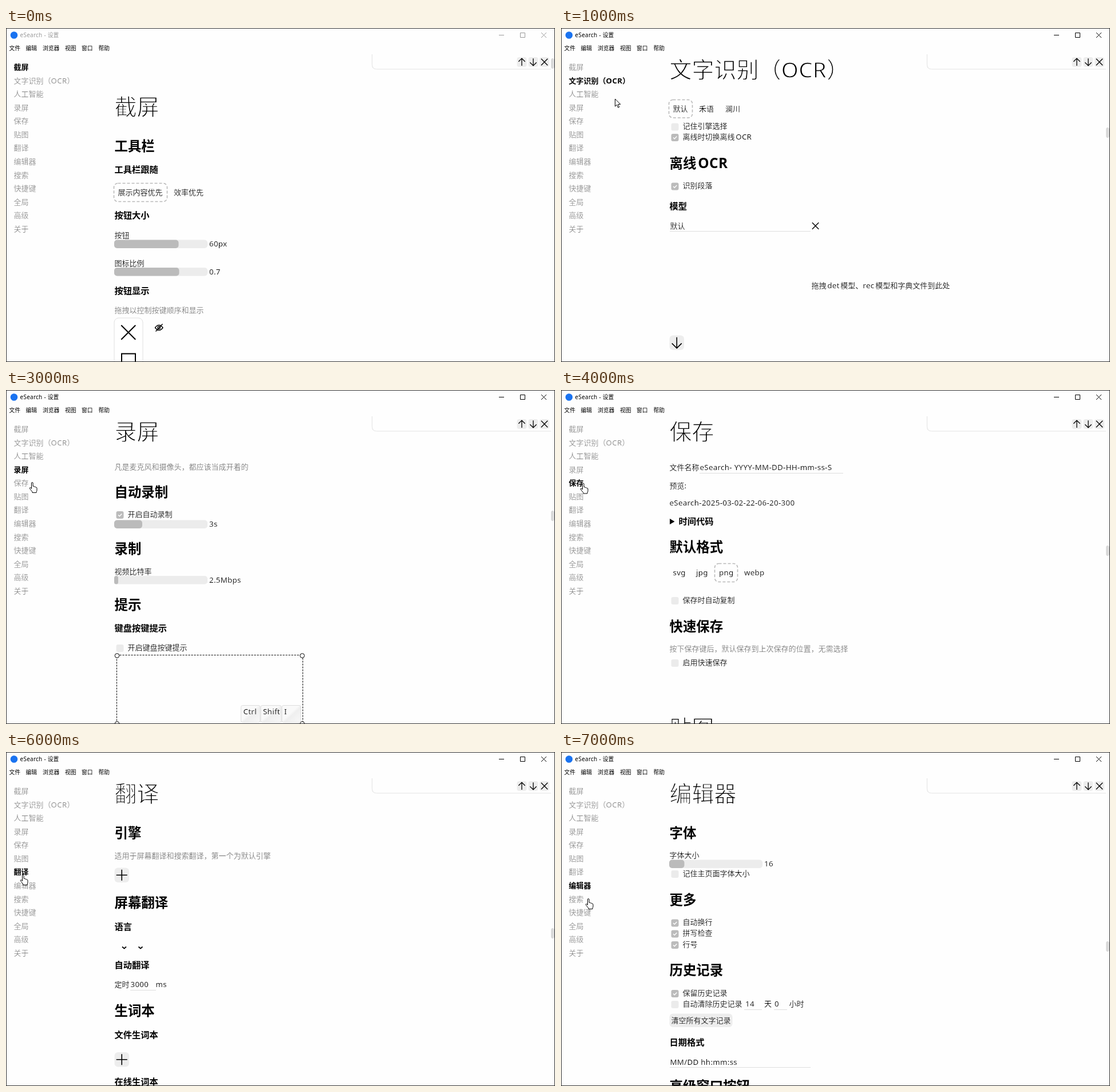
Animation, 959 px wide and 584 px high, one loop 8 s. Source, as an HTML page:

```html
<!DOCTYPE html>
<html lang="zh-CN">
<head>
<meta charset="utf-8">
<title>设置</title>
<style>
html, body { margin: 0; width: 100%; height: 100%; overflow: hidden; background: #fefefe; }
svg { display: block; font-family: "Noto Sans CJK SC", "Noto Sans", sans-serif; }
.latin { font-family: "Noto Sans", sans-serif; font-size: 1.02em; letter-spacing: .026em; }
/* a background-coloured outline thins the strokes to a light weight */
.h1, .p, .note, .nav { stroke: #fefefe; stroke-width: .2; }
.h1 { font-weight: 300; stroke-width: 1.3; }
.h1 .latin { font-size: 1em; letter-spacing: 0; }
.h2, .h3, .on { font-weight: 700; }
.h2 .latin { font-size: 1.04em; letter-spacing: .015em; }
.note { fill: #707070; }
.nav { fill: #858585; }
.line { fill: none; stroke: #000; }
.page { visibility: hidden; animation: show 8s step-end infinite; animation-delay: calc(var(--i) * 1s); }
@keyframes show {
  0% { visibility: visible; }
  12.5%, 100% { visibility: hidden; }
}
</style>
</head>
<body>
<svg id="stage" width="959" height="584" viewBox="0 0 959 584"></svg>
<script>
const SIZE = { h1: 39, h2: 23.4, h3: 15.25, p: 13, note: 13, nav: 13, on: 13, ui: 9.8 };
const ICON = {
  up: 'M12 21V3M4 11l8-8 8 8',
  down: 'M12 3v18M4 13l8 8 8-8',
  cross: 'M4 4l16 16M20 4L4 20',
  plus: 'M12 3v18M3 12h18'
};
const NAV = ['截屏', '文字识别（OCR）', '人工智能', '录屏', '保存', '贴图', '翻译',
  '编辑器', '搜索', '快捷键', '全局', '高级', '关于'];
const WORD = /[\w\u4e00-\u9fff]/;

// y is the optical middle of the line; Latin runs get a small gap beside ideographs
function text(kind, x, y, str, fill = '') {
  const size = SIZE[kind];
  let prev = '';
  const runs = str.match(/[ -~]+|[^ -~]+/g).map(run => {
    const gap = WORD.test(prev) && WORD.test(run[0]) ? size * .13 : 0;
    const cls = /[ -~]/.test(run) ? ' class="latin"' : '';
    prev = run[run.length - 1];
    return `<tspan${cls} dx="${gap}">${run}</tspan>`;
  }).join('');
  return `<text class="${kind}" x="${x}" y="${y + size * .345}" font-size="${size}"${fill && ` fill="${fill}"`}>${runs}</text>`;
}
const h1 = (y, s) => text('h1', 189.5, y, s);
const h2 = (y, s) => text('h2', 189.5, y, s);
const h3 = (y, s, x = 189.5) => text('h3', x, y, s);
const p = (y, s, x = 189.5) => text('p', x, y, s);
const note = (y, s) => text('note', 189.5, y, s);

const box = (x, y, w, h, r, fill, extra = '') =>
  `<rect x="${x}" y="${y}" width="${w}" height="${h}" rx="${r}" fill="${fill}" ${extra}/>`;
const line = (d, width = 1, color = '#000') =>
  `<path class="line" d="${d}" style="stroke:${color};stroke-width:${width}"/>`;
const icon = (name, x, y, size, width) =>
  `<g transform="translate(${x} ${y}) scale(${size / 24})">${line(ICON[name], width * 24 / size)}</g>`;
const button = (name, x, y, size, r, width) =>
  box(x, y, size, size, r, '#ededed') + icon(name, x, y, size, width);
const dashed = (x, y, w, h) =>
  box(x, y, w, h, 7, 'none', 'stroke="#b9b9b9" stroke-width="1.6" stroke-dasharray="5 3"');
const underline = (x1, x2, y) => line(`M${x1} ${y}H${x2}`, 1, '#dedede');

function slider(y, end, label) {
  return box(189, y, 163, 14.5, 5, '#ececec') + box(189, y, end - 189, 14.5, Math.min(5, (end - 189) / 2), '#bbb') +
    p(y + 7.5, label, 355);
}
function check(y, label, on) {
  return box(192.5, y - 5.5, 13, 13, 3, on ? '#bbb' : '#ebebeb') +
    (on ? line(`M196 ${y + 1}l2.3 2.3 4-4.3`, 1.4, '#fff') : '') + p(y, label, 212.5);
}
function keycap(x, w, label) {
  return box(x, 551.5, w, 30, 3, 'url(#key)', 'stroke="#ddd"') + p(563, label, x + 4);
}

const arrow = (x, y) => `<path transform="translate(${x} ${y})" fill="#fff" stroke="#000"
  d="M0 0v13l3-2.8 2.2 5 2.1-1-2.2-4.8h4.2z"/>`;
const hand = (x, y) => `<path transform="translate(${x} ${y})" fill="#fff" stroke="#000" stroke-linejoin="round"
  d="M4 2q0-1.5 1.3-1.5T6.6 2V7.2q2.4-.4 2.6 1 2-.3 2.3.9 2-.2 2 1.4V14q0 1.5-1 3v1.5H5.5V17L1 11.5q-.8-1.6.6-1.8T4 11.5z"/>`;

const grips = [[194, 464.5], [517.5, 464.5], [194, 583.5], [517.5, 583.5]]
  .map(([x, y]) => `<circle cx="${x}" cy="${y}" r="3.8" fill="#fff" stroke="#000"/>`).join('');

const pages = [
  { nav: 0, thumb: 53, cursor: '', body: [
    h1(139, '截屏'), h2(207, '工具栏'), h3(248, '工具栏跟随'),
    dashed(188.5, 271.5, 93, 32), p(288, '展示内容优先', 195.5), p(288, '效率优先', 293),
    h3(328, '按钮大小'),
    p(363, '按钮'), slider(370.5, 301.5, '60px'),
    p(411.5, '图标比例'), slider(419, 302.5, '0.7'),
    h3(459.5, '按钮显示'), note(493.5, '拖拽以控制按键顺序和显示'),
    box(189, 507, 50, 100, 8, '#fff', 'stroke="#e0e0e0"'),
    icon('cross', 195, 513.5, 37.5, 2), line('M202 590V569.5H226V590', 2),
    line('M260.5 524q6.5-9 13.5 0q-6.5 9-13.5 0zM261.5 530.5l12-13', 1.4),
    '<circle class="line" cx="267.2" cy="524" r="2.3" stroke-width="1.3"/>'
  ] },
  { nav: 1, thumb: 174, cursor: arrow(94.5, 124), body: [
    h1(74, '文字识别（OCR）'),
    dashed(188.5, 125.5, 41, 31.5), p(142, '默认', 195.5), p(142, '禾语', 241), p(142, '澜川', 287),
    check(172, '记住引擎选择'), check(190.5, '离线时切换离线OCR', true),
    h2(237, '离线OCR'), check(276, '识别段落', true),
    h3(311.5, '模型'), p(346.5, '默认', 190.5), underline(190, 436, 355.5),
    icon('cross', 436, 337.5, 17, 1.4),
    p(451, '拖拽det模型、rec模型和字典文件到此处', 437.5),
    button('down', 189.5, 537.5, 25.5, 6, 1.6)
  ] },
  { nav: 2, thumb: 198, cursor: hand(66, 142), body: [h1(74, '人工智能')] },
  { nav: 3, thumb: 211, cursor: hand(40.5, 161), body: [
    h1(74, '录屏'), note(134.5, '凡是麦克风和摄像头，都应该当成开着的'),
    h2(178.5, '自动录制'), check(217.5, '开启自动录制', true), slider(227.5, 238, '3s'),
    h2(278, '录制'), p(317.5, '视频比特率'), slider(325, 196, '2.5Mbps'),
    h2(376, '提示'), h3(416.5, '键盘按键提示'), check(450.5, '开启键盘按键提示'),
    box(193.5, 463.5, 325, 130, 0, 'none', 'stroke="#000" stroke-dasharray="3 2"'), grips,
    keycap(410.5, 33.5, 'Ctrl'), keycap(445, 36, 'Shift'), keycap(482, 33, 'I')
  ] },
  { nav: 4, thumb: 272, cursor: hand(33.5, 162.5), body: [
    h1(74, '保存'),
    p(135.5, '文件名称'), p(135.5, 'eSearch- YYYY-MM-DD-HH-mm-ss-S', 242.5), underline(242, 493, 145.5),
    p(168, '预览:'), p(197.5, 'eSearch-2025-03-02-22-06-20-300'),
    '<path d="M190 225l8.5 5-8.5 5z"/>', h3(230, '时间代码', 205.5),
    h2(275, '默认格式'),
    p(320, 'svg', 195.5), p(320, 'jpg', 236), p(320, 'png', 276), p(320, 'webp', 320),
    dashed(268.5, 303.5, 40, 32),
    check(367.5, '保存时自动复制'), h2(414, '快速保存'),
    note(453, '按下保存键后，默认保存到上次保存的位置，无需选择'),
    check(476.5, '启用快速保存'), h1(592, '贴图')
  ] },
  { nav: 5, thumb: 289, cursor: hand(30, 188), body: [h1(74, '贴图')] },
  { nav: 6, thumb: 308, cursor: hand(24.5, 214), body: [
    h1(74, '翻译'), h2(141.5, '引擎'),
    note(182, '适用于屏幕翻译和搜索翻译，第一个为默认引擎'), button('plus', 189.5, 202.5, 25.5, 6, 1.6),
    h2(263.5, '屏幕翻译'), h3(305.5, '语言'),
    line('M203 340.5l3.5 3.2 3.5-3.2M231.5 340.5l3.5 3.2 3.5-3.2', 1.7),
    h3(372.5, '自动翻译'),
    p(407, '定时'), p(407, '3000', 217.5), p(407, 'ms', 261.5), underline(217, 262, 416.5),
    h2(453, '生词本'), h3(494.5, '文件生词本'), button('plus', 189.5, 525, 25.5, 6, 1.6),
    h3(577, '在线生词本')
  ] },
  { nav: 7, thumb: 331, cursor: hand(42.5, 256), body: [
    h1(74, '编辑器'), h2(141.5, '字体'),
    p(181, '字体大小'), slider(188.5, 215.5, '16'), check(212.5, '记住主页面字体大小'),
    h2(258.5, '更多'),
    check(298, '自动换行', true), check(317, '拼写检查', true), check(336.5, '行号', true),
    h2(382, '历史记录'),
    check(421.5, '保留历史记录', true), check(440.5, '自动清除历史记录'),
    p(441, '14', 322), p(441, '天', 355), p(441, '0', 373), p(441, '小时', 398.5),
    underline(320, 351, 450.5), underline(372, 395, 450.5),
    box(189.5, 457.5, 110, 23.5, 6, '#ededed'), p(470, '清空所有文字记录', 192.5),
    h3(507.5, '日期格式'), p(542.5, 'MM/DD hh:mm:ss', 190.5), underline(190, 436, 551.5),
    h2(585, '高级窗口按钮')
  ] }
];

function page({ nav, thumb, cursor, body }, i) {
  const ink = i ? '#000' : '#999';
  const items = NAV.map((s, k) => text(k === nav ? 'on' : 'nav', 13.5, 68.5 + k * 23.58, s));
  return `<g class="page" style="--i:${i}">` + body.join('') + items.join('') +
    box(952, thumb, 6, 18, 3, '#dadada') +
    text('ui', 24.5, 13, 'eSearch - 设置', ink) +
    line('M861 12.5h9M898.5 8.5h8v8h-8zM935 8l9 9M944 8l-9 9', 1, ink) + cursor + '</g>';
}

const menu = [['文件', 5.5], ['编辑', 34.5], ['浏览器', 64], ['视图', 103], ['窗口', 132], ['帮助', 161.5]]
  .map(([s, x]) => text('ui', x, 36, s)).join('');

document.getElementById('stage').innerHTML =
  '<defs><linearGradient id="key" x2="1" y2="1"><stop offset=".45" stop-color="#f9f9f9"/>' +
  '<stop offset=".55" stop-color="#efefef"/><stop offset="1" stop-color="#f8f8f8"/></linearGradient></defs>' +
  '<rect width="959" height="584" fill="#fefefe"/>' +
  '<circle cx="14" cy="12.5" r="6.3" fill="#1a73f0"/>' + menu +
  line('M639.5 46V64q0 8 8 8H952', 1.2, '#e6e6e6') +
  button('up', 892.5, 51, 17, 4, 1.3) + button('down', 912.5, 51, 17, 4, 1.3) + button('cross', 932, 51, 17, 4, 1.3) +
  pages.map(page).join('') +
  box(.5, .5, 958, 583, 0, 'none', 'stroke="#333"');
</script>
</body>
</html>
```
